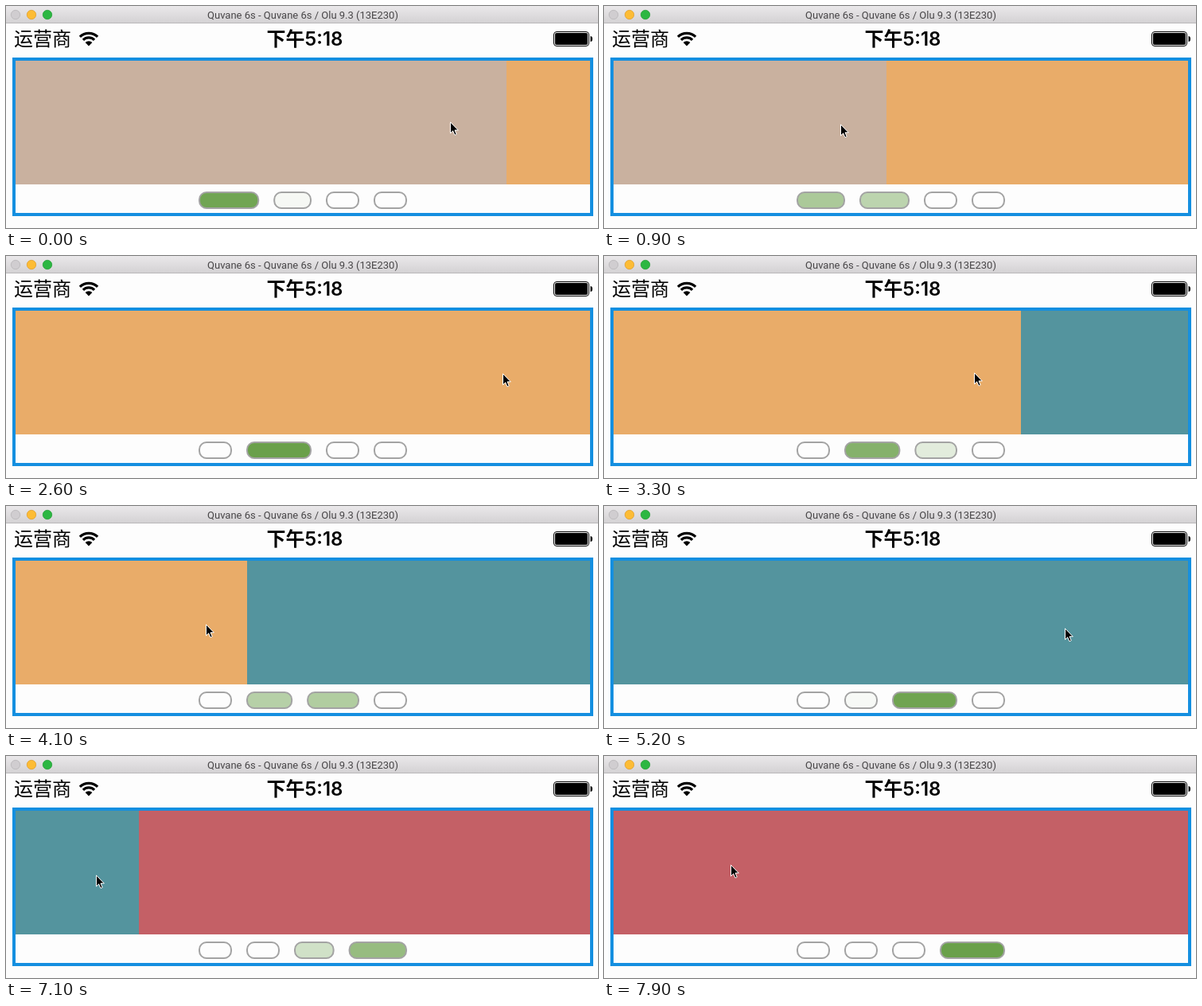
Animation of 744 by 280 pixels, one loop 8000 ms. Source, as an HTML page:

```html
<!DOCTYPE html>
<html lang="zh">
<head>
<meta charset="utf-8">
<style>
html, body { margin: 0; width: 100%; height: 100%; overflow: hidden; background: #fdfdfd; }
svg { display: block; }
.title { font: 13px Roboto, "Liberation Sans", sans-serif; fill: #484648; }
.status { font: 24px Inter, "Noto Sans CJK SC", "Noto Sans CJK", sans-serif; }
.clock { font-weight: 600; }
</style>
</head>
<body>
<svg width="744" height="280" viewBox="0 0 744 280">
  <defs>
    <linearGradient id="bar" x2="0" y2="1">
      <stop stop-color="#eae8ea"/><stop offset="1" stop-color="#d3d1d3"/>
    </linearGradient>
    <clipPath id="view"><rect x="12" y="69" width="722" height="156"/></clipPath>
  </defs>
  <rect width="744" height="280" fill="#fdfdfd"/>
  <rect width="744" height="22" fill="url(#bar)"/>
  <rect y="21" width="744" height="1" fill="#b9b7b9"/>
  <g stroke-width=".8">
    <circle cx="12" cy="11" r="5.7" fill="#d0cdd0" stroke="#b9b6b9"/>
    <circle cx="32" cy="11" r="5.7" fill="#fdbc35" stroke="#e0a02f"/>
    <circle cx="52" cy="11" r="5.7" fill="#2cb742" stroke="#25a036"/>
  </g>
  <text class="title" x="373" y="16" text-anchor="middle">Quvane 6s - Quvane 6s / Olu 9.3 (13E230)</text>

  <text class="status" x="10" y="50">运营商</text>
  <text class="status clock" x="375.5" y="50" text-anchor="middle">下午5:18</text>
  <g fill="none" stroke="#000" stroke-width="3.2">
    <path d="M92.9 38.9A15.7 15.7 0 0 1 115.1 38.9"/>
    <path d="M96.9 42.9A10 10 0 0 1 111.1 42.9"/>
  </g>
  <path d="M104 50.5L99.6 46.1A6.2 6.2 0 0 1 108.4 46.1Z"/>
  <rect x="688.5" y="32.5" width="44" height="18" rx="3.5" fill="none" stroke="#000"/>
  <rect x="690" y="34" width="41" height="15" rx="2"/>
  <path d="M734.5 38q2.5 0 2.5 3.5t-2.5 3.5z"/>

  <g clip-path="url(#view)"><g id="pages"></g></g>
  <rect x="10" y="67" width="726" height="196" fill="none" stroke="#148fe0" stroke-width="4"/>
  <g id="pills" stroke="#a3a3a3" stroke-width="2"></g>
  <path id="cursor" d="M.5 .5V14.5L3.7 11.5L5.9 16.7L8.2 15.7L6 10.7H10.3Z" stroke="#fff" stroke-width="1"/>
</svg>
<script>
const LOOP = 8000, WIDTH = 722, LAG = 200;
const WHITE = [253, 253, 253], GREEN = [106, 160, 74];

// [time, page position, ease out on arrival]
const scroll = [
  [-200, .05], [0, .145], [1600, .82], [1800, .852], [1900, .88], [2250, 1, 1],
  [2750, 1], [3300, 1.29], [4100, 1.596], [4820, 1.86], [5200, 2, 1],
  [5400, 2], [6150, 2.25], [6400, 2.478], [7250, 2.85], [7600, 3, 1]
];
const cursorX = [
  [0, 558], [1600, 95], [1800, 72], [1900, 52], [2050, 52], [2650, 675], [2750, 675],
  [3300, 465], [4100, 251], [4820, 60], [4880, 60], [5200, 578], [5350, 680], [5400, 680],
  [6150, 498], [6400, 334], [7250, 66], [7500, 66], [7900, 159], [8000, 195]
];
const cursorY = [
  [0, 146], [1800, 152], [2700, 148], [3300, 147], [4100, 149],
  [5200, 154], [6400, 149], [7250, 150], [7900, 137]
];

function at(keys, t) {
  const i = keys.findIndex(k => k[0] > t);
  if (i < 0) return keys[keys.length - 1][1];
  if (i === 0) return keys[0][1];
  const [t0, a] = keys[i - 1], [t1, b, ease] = keys[i];
  const u = (t - t0) / (t1 - t0);
  return a + (b - a) * (ease ? u * (2 - u) : u);
}

function addRect(parent, attrs) {
  const el = document.createElementNS("http://www.w3.org/2000/svg", "rect");
  for (const name in attrs) el.setAttribute(name, attrs[name]);
  return parent.appendChild(el);
}

const pages = document.getElementById("pages");
const pillGroup = document.getElementById("pills");
const cursor = document.getElementById("cursor");
["#c9b19f", "#e9ac69", "#54949e", "#c46066"].forEach((fill, i) =>
  addRect(pages, { x: 12 + i * WIDTH, y: 69, width: WIDTH, height: 156, fill }));
const pills = [0, 1, 2, 3].map(() => addRect(pillGroup, { y: 235, height: 20, rx: 9 }));

const share = (i, pos) => Math.max(0, 1 - Math.abs(i - pos));

function draw(t) {
  const pos = at(scroll, t), tint = at(scroll, t - LAG);
  pages.setAttribute("transform", `translate(${-Math.round(pos * WIDTH)} 0)`);
  let x = 242;
  pills.forEach((pill, i) => {
    const width = 42 + 40 * share(i, pos), s = share(i, tint);
    pill.setAttribute("x", x + 1);
    pill.setAttribute("width", width - 2);
    pill.setAttribute("fill", `rgb(${WHITE.map((c, k) => Math.round(c + (GREEN[k] - c) * s))})`);
    x += width + 18;
  });
  cursor.setAttribute("transform", `translate(${Math.round(at(cursorX, t))} ${Math.round(at(cursorY, t))})`);
}

const start = performance.now();
function tick() {
  draw((performance.now() - start) % LOOP);
  requestAnimationFrame(tick);
}
tick();
</script>
</body>
</html>
```
